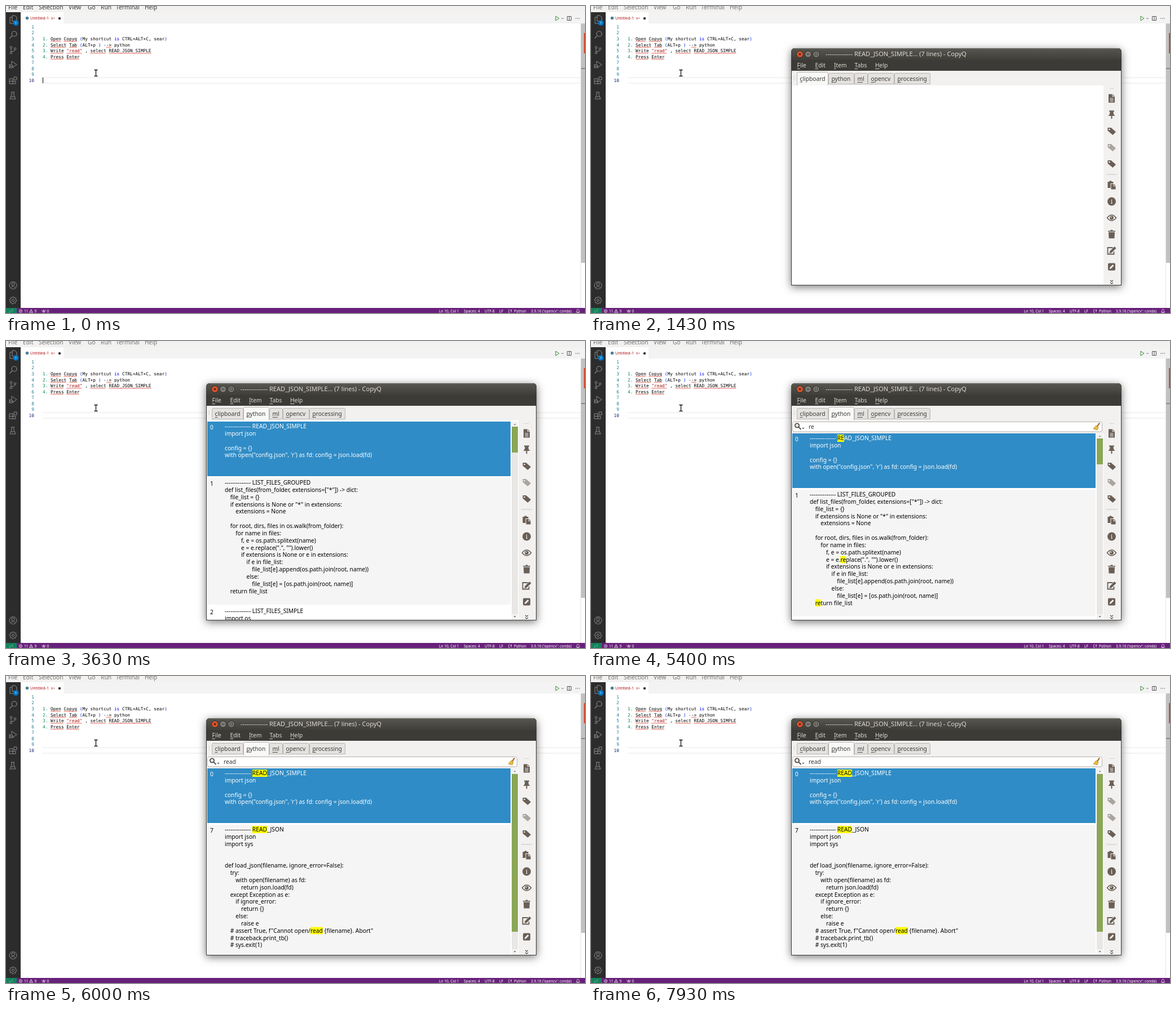
These frames come from a looping animation (1027x545 px, 8 s). An HTML page with a canvas:

```html
<!DOCTYPE html>
<html lang="en">
<head>
<meta charset="utf-8">
<title>Snippet search</title>
<style>
html, body { margin: 0; width: 100%; height: 100%; overflow: hidden; background: #fff; }
canvas { display: block; }
</style>
</head>
<body>
<canvas id="stage" width="1027" height="545"></canvas>
<script>
const ctx = document.getElementById('stage').getContext('2d');
const LOOP = 8000;
const UI = '"Noto Sans", "Open Sans", sans-serif';
const MONO = '"DejaVu Sans Mono", monospace';
const SIZE = 10.25;
const LINE = 12.82;
const INDENT = 9.65;
const DASHES = '-'.repeat(14) + ' ';

const readSimple = {
  id: 0, height: 97,
  lines: [DASHES + 'READ_JSON_SIMPLE', 'import json', '', 'config = {}',
    'with open("config.json", \'r\') as fd: config = json.load(fd)']
};
const listGrouped = {
  id: 1, height: 225,
  lines: [DASHES + 'LIST_FILES_GROUPED',
    'def list_files(from_folder, extensions=["*"]) -> dict:',
    '\tfile_list = {}',
    '\tif extensions is None or "*" in extensions:',
    '\t\textensions = None',
    '',
    '\tfor root, dirs, files in os.walk(from_folder):',
    '\t\tfor name in files:',
    '\t\t\tf, e = os.path.splitext(name)',
    '\t\t\te = e.replace(".", "").lower()',
    '\t\t\tif extensions is None or e in extensions:',
    '\t\t\t\tif e in file_list:',
    '\t\t\t\t\tfile_list[e].append(os.path.join(root, name))',
    '\t\t\t\telse:',
    '\t\t\t\t\tfile_list[e] = [os.path.join(root, name)]',
    '\treturn file_list']
};
const listSimple = { id: 2, height: 120, lines: [DASHES + 'LIST_FILES_SIMPLE', 'import os'] };
const readJson = {
  id: 7, height: 263,
  lines: [DASHES + 'READ_JSON', 'import json', 'import sys', '', '',
    'def load_json(filename, ignore_error=False):',
    '\ttry:',
    '\t\twith open(filename) as fd:',
    '\t\t\treturn json.load(fd)',
    '\texcept Exception as e:',
    '\t\tif ignore_error:',
    '\t\t\treturn {}',
    '\t\telse:',
    '\t\t\traise e',
    '\t# assert True, f"Cannot open/read {filename}. Abort"',
    '\t# traceback.print_tb()',
    '\t# sys.exit(1)']
};
const allItems = [readSimple, listGrouped, listSimple];
const readItems = [readSimple, readJson];

function rect(x, y, w, h, color) {
  ctx.fillStyle = color;
  ctx.fillRect(x, y, w, h);
}

function text(str, x, y, color, size = SIZE, font = UI, align = 'left') {
  ctx.font = size + 'px ' + font;
  ctx.textAlign = align;
  ctx.fillStyle = color;
  ctx.fillText(str, x, y);
}

function circle(x, y, r, color) {
  ctx.fillStyle = color;
  ctx.beginPath();
  ctx.arc(x, y, r, 0, 7);
  ctx.fill();
}

function box(x, y, w, h, radius, fill, stroke) {
  ctx.beginPath();
  ctx.roundRect(x, y, w, h, radius);
  if (fill) { ctx.fillStyle = fill; ctx.fill(); }
  if (stroke) { ctx.strokeStyle = stroke; ctx.lineWidth = 1; ctx.stroke(); }
}

function shape(x, y, d, fill, stroke, width = 1) {
  ctx.save();
  ctx.translate(x, y);
  const path = new Path2D(d);
  if (fill) { ctx.fillStyle = fill; ctx.fill(path, 'evenodd'); }
  if (stroke) { ctx.strokeStyle = stroke; ctx.lineWidth = width; ctx.stroke(path); }
  ctx.restore();
}

function ring(x, y, r) {
  return `M${x + r} ${y}A${r} ${r} 0 1 1 ${x - r} ${y}A${r} ${r} 0 1 1 ${x + r} ${y}Z`;
}

function clipTo(x, y, w, h, draw) {
  ctx.save();
  ctx.beginPath();
  ctx.rect(x, y, w, h);
  ctx.clip();
  draw();
  ctx.restore();
}

// ---- editor ----

const CHAR = 4.7;
const rowY = n => 37 + (n - 1) * 10.56;
const codeX = col => 65 + col * CHAR;

// Row, column, text, colour
const code = [
  [3, 0, '1.', '#098658'], [3, 3, 'Open Copyq'], [3, 14, '(', '#0431fa'],
  [3, 15, 'My shortcut'], [3, 27, 'is', '#0000ff'], [3, 30, 'CTRL+ALT+C, sear'], [3, 46, ')', '#0431fa'],
  [4, 0, '2.', '#098658'], [4, 3, 'Select Tab'], [4, 14, '(', '#0431fa'],
  [4, 15, 'ALT+p'], [4, 21, ')', '#0431fa'], [4, 23, '--> python'],
  [5, 0, '3.', '#098658'], [5, 3, 'Write'], [5, 9, '"read"', '#a31515'],
  [5, 16, ', select READ_JSON_SIMPLE'],
  [6, 0, '4.', '#098658'], [6, 3, 'Press Enter']
];
// Row, first column, length
const errors = [[3, 3, 4], [3, 8, 5], [4, 3, 6], [4, 10, 3], [4, 24, 2],
  [5, 3, 5], [5, 9, 6], [5, 18, 6], [5, 25, 16], [6, 3, 5], [6, 9, 5]];

function squiggle(row, col, len) {
  const y = rowY(row) + 4.7, end = codeX(col + len);
  ctx.beginPath();
  for (let x = codeX(col), i = 0; x <= end; x += 1.5, i++) ctx.lineTo(x, y + (i % 2 ? -.7 : .7));
  ctx.strokeStyle = '#e0402f';
  ctx.lineWidth = .9;
  ctx.stroke();
}

function activityBar() {
  const c = '#8b8b8b';
  rect(0, 11, 26, 525, '#2c2c2c');
  shape(13, 24, 'M-2-7H3L6-4V3H-2ZM-2-4H-6V7H2V3', null, c);
  circle(17.5, 30, 4.8, '#007acc');
  text('1', 17.5, 32.3, '#fff', 6, UI, 'center');
  shape(13, 51, ring(1.5, -1.5, 4.5) + 'M-1.7 1.7L-6.5 6.5', null, c, 1.2);
  shape(12, 78, ring(-3, -4.5, 1.8) + ring(-3, 5, 1.8) + ring(4, -2, 1.8) + 'M-3-2.5V3M4 0Q4 2-2 3', null, c);
  shape(12, 104, 'M-2-6L7 0L0 5M-2-6V-1' + ring(-3, 3, 3) + 'M-7 0L-5 1M-7 6L-5 5M1 6L0 5M-6 3H0', null, c);
  shape(12, 132, 'M-6-3H0V6H-6ZM-6 1.5H5V6H0M2-6H7V-1H2Z', null, c);
  shape(12, 159, 'M-3-6H3M-2-6V-1L-5 6H5L2-1V-6M-3.5 2H3.5', null, c);
  shape(12.5, 496, ring(0, 0, 6.5) + ring(0, -2, 2.6) + 'M-4.5 4.5Q0-1 4.5 4.5', null, c);
  let gear = ring(0, 0, 2);
  for (let i = 0; i <= 32; i++) {
    const a = i * Math.PI / 16, r = i % 4 < 2 ? 6.5 : 4.8;
    gear += (i ? 'L' : 'M') + r * Math.cos(a) + ' ' + r * Math.sin(a);
  }
  shape(12.5, 522.5, gear, null, c);
}

function statusBar() {
  const label = (s, x) => text(s, x, 544, '#fff', 6.6);
  rect(0, 536, 1027, 9, '#68217a');
  rect(0, 536, 19, 9, '#16825d');
  shape(9, 541.5, 'M-3-1L-1 1L-3 3M3-3L1-1L3 1', null, '#7fe0bd', .8);
  shape(26, 541.5, ring(0, 0, 2.6) + 'M-1-1L1 1M1-1L-1 1', null, '#fff', .7);
  label('11', 32);
  shape(44.5, 541.5, 'M0-3L3 2.5H-3ZM0-1V1', null, '#fff', .7);
  label('9', 50.5);
  shape(67, 541.5, 'M-3-2Q-3 0-1.5 2L0-2L1.5 2Q3 0 3-2M0-2V3', null, '#fff', .7);
  label('0', 72.5);
  label('Ln 10, Col 1', 768);
  label('Spaces: 4', 812);
  label('UTF-8', 849);
  label('LF', 875);
  shape(894, 541.5, 'M-1-3Q-2.5-3-2-1L-3 0L-2 1Q-2.5 3-1 3M1-1H3M2-3V2', null, '#fff', .8);
  label('Python', 901);
  label("3.9.16 ('opencv': conda)", 931);
  shape(1014.5, 541.5, 'M-3 2L-2 0V-1Q-2-3 0-3T2-1V0L3 2ZM-1 3H1', null, '#fff', .7);
}

function editor(t) {
  rect(0, 0, 1027, 545, '#fff');
  rect(0, 0, 1027, 11, '#f2f1f0');
  const menu = t < 1430 ? '#3c3c3c' : '#777572';
  [['File', 4], ['Edit', 30], ['Selection', 58], ['View', 111], ['Go', 145],
    ['Run', 168], ['Terminal', 195], ['Help', 246]].forEach(([s, x]) => text(s, x, 6.2, menu));
  rect(26, 11, 1001, 20, '#f3f3f3');
  rect(26, 11, 76, 20, '#fff');
  circle(37.5, 21.5, 2.8, '#4f8197');
  text('Untitled-1', 43, 24.3, '#b01011', 7.1);
  text('9+', 80, 24, '#b01011', 6);
  circle(95, 22, 2.2, '#333');
  shape(978, 22, 'M-3-4L3 0L-3 4Z', null, '#388a34');
  shape(987, 22, 'M-2-1L0 1L2-1', null, '#555', .8);
  shape(999, 22, 'M-3.5-3.5H3.5V3.5H-3.5ZM0-3.5V3.5', null, '#555');
  for (const x of [1011, 1014, 1017]) circle(x, 22, .7, '#444');

  activityBar();

  rect(65, 126.7, 954, 1, '#e7e7e7');
  rect(65, 136.5, 954, 1, '#e7e7e7');
  for (let n = 1; n <= 10; n++) {
    text(n, 50, rowY(n) + 2.9, n === 10 ? '#0b216f' : '#237893', 7.8, MONO, 'right');
  }
  for (const [row, col, s, color = '#000'] of code) text(s, codeX(col), rowY(row) + 2.9, color, 7.8, MONO);
  for (const e of errors) squiggle(...e);
  if (t < 470) rect(65, 127, 1, 10, '#000');

  rect(1019, 31, 1, 505, '#e4e4e4');
  rect(1020, 31, 7, 425, '#c1c1c1');
  rect(1025, 48, 2, 36, '#d1492c');
  rect(1020, 110.5, 7, 1, '#55555a');
  shape(159.5, 119, 'M-3-5.5H-1L0-4.5L1-5.5H3M0-4.5V4.5M-3 5.5H-1L0 4.5L1 5.5H3', null, '#fff', 2.6);
  shape(159.5, 119, 'M-3-5.5H-1L0-4.5L1-5.5H3M0-4.5V4.5M-3 5.5H-1L0 4.5L1 5.5H3', null, '#111', 1.3);
  statusBar();
}

// ---- clipboard manager ----

function mnemonic(s, x, y, color) {
  text(s, x, y, color);
  rect(x, y + 2, ctx.measureText(s[0]).width, .9, color);
}

function tabs(active) {
  const edges = [365, 421, 467, 491, 538, 602];
  ['clipboard', 'python', 'ml', 'opencv', 'processing'].forEach((name, i) => {
    const on = name === active, x = edges[i], w = edges[i + 1] - x;
    box(x + .5, (on ? 117 : 119) + .5, w - 1, on ? 24 : 19, [2, 2, 0, 0], on ? '#f8f8f7' : '#e5e3e1', '#b9b4af');
    if (on) rect(x + 1, 139, w - 2, 4, '#f8f8f7');
    mnemonic(name, x + 5.5, on ? 132.5 : 133, '#3c3b37');
  });
}

function toolbar(tagDim) {
  const c = '#6a5f56', x = 923.5, bg = '#f2f1f0', dim = '#aaa49f';
  const tag = 'M-7-6H-1L7.5 1.5L2 7L-7-.5Z' + ring(-4, -3, 1.3);
  for (let i = 0; i < 4; i++) rect(920 + i * 2, 146, 1, 1, '#bbb6b1');
  shape(x, 164, 'M-5.5-7.5H1.5L5.5-3.5V7.5H-5.5Z', c);
  shape(x, 164, 'M1.5-7V-3.5H5M-3 0H3M-3 2.5H3M-3 5H3', null, bg);
  shape(x, 193, 'M-4.5-7.5H4.5V-5.5H3L3.5-1L6 2H1V6L0 8L-1 6V2H-6L-3.5-1L-3-5.5H-4.5Z', c);
  shape(x, 222, tag, tagDim ? dim : c);
  shape(x, 251, tag, dim);
  shape(x, 280, tag, c);
  rect(914, 298.5, 19, 1, '#c9c5c1');
  shape(x, 318, 'M-7-6H-4V-7.5H0V-6H3V-3H-2V5H-7ZM-1-2H4L7 1V7.5H-1Z', c);
  shape(x, 318, 'M3.5-1.5V1.5H6.5', null, bg);
  circle(x, 347, 7.5, c);
  text('i', x, 351, bg, 11, 'bold "Noto Serif", serif'.slice(5), 'center');
  shape(x, 376, 'M-8 0Q0-10 8 0Q0 10-8 0Z', null, c, 1.6);
  circle(x, 376, 3.4, c);
  circle(x - 1, 375, 1.1, bg);
  shape(x, 405, 'M-6.5-6H-2V-7.5H2V-6H6.5V-4.5H-6.5ZM-5.5-3.5H5.5L5 7.5H-5Z', c);
  shape(x, 434, 'M2-5H-7V6.5H4V2', null, c, 1.8);
  shape(x, 434, 'M-3 1L5-7L8-4L0 4L-4 5Z', c);
  box(x - 6.5, 456.5, 13, 13, 2, c);
  shape(x, 463, 'M-4 4L-3 1L2-4L4-2L-1 3Z', bg);
  shape(x, 490, 'M-2.5-3L0-1L2.5-3M-2.5 1L0 3L2.5 1', null, '#444', 1.1);
}

function itemLine(line, x, y, color, query) {
  const s = line.replace(/^\t+/, '');
  x += (line.length - s.length) * INDENT;
  text(s, x, y, color);
  if (!query) return;
  const low = s.toLowerCase();
  for (let i = low.indexOf(query); i >= 0; i = low.indexOf(query, i + query.length)) {
    const part = s.substr(i, query.length);
    const left = x + ctx.measureText(s.slice(0, i)).width;
    rect(left, y - 10, ctx.measureText(part).width, 12.8, '#ffff00');
    text(part, left, y, '#000');
  }
}

function scrollbar(top, from, to) {
  rect(897, top, 11, 495 - top, '#e9e7e5');
  rect(897, top, 11, 9, '#f4f3f2');
  rect(897, 485, 11, 10, '#f4f3f2');
  shape(902.5, top + 5, 'M-2 1L0-1L2 1Z', '#777');
  shape(902.5, 489.5, 'M-2-1L0 1L2-1Z', '#444');
  rect(897, from, 11, to - from, '#8aa657');
}

// Draws items from `top` down to the lower window edge
function itemList(items, top, { selected = 0, query = '', scroll = 0, handle }) {
  clipTo(357, top, 552, 495 - top, () => {
    rect(357, top, 552, 495 - top, '#fff');
    let y = top - scroll;
    items.forEach((item, i) => {
      const on = i === selected, color = on ? '#fff' : '#000';
      rect(357, y, 538, item.height, on ? '#308cc6' : i % 2 ? '#f5f5f5' : '#fff');
      text(item.id, 362, y + 13.7, color);
      item.lines.forEach((line, n) => itemLine(line, 388, y + 12.2 + n * LINE, color, query));
      y += item.height + 3;
    });
    scrollbar(top, ...handle);
  });
}

function searchBar(query) {
  rect(357, 141, 552, 23, '#f2f1f0');
  box(357.5, 143.5, 549, 17.5, 3, '#fff', '#b8b1aa');
  shape(367, 151, ring(-1.5, -1, 3.6) + 'M1.5 2L5.5 6', null, '#55504b', 1.9);
  shape(376.5, 155, 'M-2-1H2L0 1.5Z', '#55504b');
  text(query, 386, 155.5, '#333');
  shape(897, 152, 'M4-7L6-6L2 0L0-1Z', '#a5682a');
  shape(897, 152, 'M-1-2L3 1L1 6L-6 4Z', '#e8bd3c', '#a57a22', .7);
}

function content(t) {
  const small = [173, 219], large = [174, 454];
  if (t < 3630) return;
  if (t < 5070) {
    itemList(allItems, 143, { handle: [152, 198] });
    if (t >= 4970) {
      rect(357, 162, 552, 2, '#fff');
      itemList(allItems.slice(0, 2), 164, { handle: small });
      rect(897, 485, 11, 10, '#e9e7e5');
    }
    return;
  }
  // The list follows the typed text a moment later
  const typed = 'read'.slice(0, t < 5330 ? 1 : t < 5570 ? 2 : t < 5930 ? 3 : 4);
  const query = 'read'.slice(0, t < 5400 ? 1 : t < 5670 ? 2 : t < 6000 ? 3 : 4);
  const second = t >= 7330 && t < 7930;
  const found = query.length > 2;
  itemList(found ? readItems : allItems.slice(0, 2), 164, {
    query,
    selected: second ? 1 : 0,
    scroll: second ? 34.4 : 0,
    handle: second ? [203, 485] : found ? large : small
  });
  searchBar(typed);
}

function manager(t) {
  ctx.save();
  ctx.shadowColor = 'rgba(0,0,0,.55)';
  ctx.shadowBlur = 15;
  ctx.shadowOffsetY = 3;
  box(355, 75, 586, 421, [6, 6, 0, 0], '#3c3b37');
  ctx.restore();
  const grad = ctx.createLinearGradient(0, 75, 0, 96);
  grad.addColorStop(0, '#57564f');
  grad.addColorStop(1, '#3f3e39');
  box(355, 75, 586, 21, [6, 6, 0, 0], grad);
  rect(361, 75.5, 574, 1, '#6c6b64');
  circle(370.5, 85.5, 6.2, '#302f2b');
  circle(370.5, 85.5, 5.3, '#e9572c');
  shape(370.5, 85.5, 'M-2-2L2 2M2-2L-2 2', null, '#4b2114', 1.3);
  for (const x of [385, 399.5]) {
    circle(x, 85.5, 6.2, '#302f2b');
    circle(x, 85.5, 5.3, '#807d75');
  }
  shape(385, 85.5, 'M-2.5 0H2.5', null, '#3c3b37', 1.3);
  shape(399.5, 85.5, 'M-2.2-2.2H2.2V2.2H-2.2Z', null, '#3c3b37');
  text('-'.repeat(14), 416, 89.3, '#dfdbd2', 10.7);
  text('READ_JSON_SIMPLE... (7 lines) - CopyQ', 467, 89.3, '#dfdbd2', 11.05);
  [['File', 365.5], ['Edit', 397.5], ['Item', 431], ['Tabs', 467.5], ['Help', 504]]
    .forEach(([s, x]) => mnemonic(s, x, 109, '#dfdbd2'));
  rect(356, 115, 584, 380, '#f2f1f0');
  for (let i = 0; i < 4; i++) rect(360, 124 + i * 2, 1, 1, '#bbb6b1');
  tabs(t < 3630 ? 'clipboard' : 'python');
  rect(356, 141, 553, 354, '#fff');
  content(t);
  toolbar(t >= 7930);
}

function frame() {
  const t = performance.now() % LOOP;
  editor(t);
  if (t >= 1000) {
    ctx.globalAlpha = t < 1050 ? .35 : t < 1100 ? .7 : 1;
    manager(t);
    ctx.globalAlpha = 1;
  }
  requestAnimationFrame(frame);
}
frame();
</script>
</body>
</html>
```
